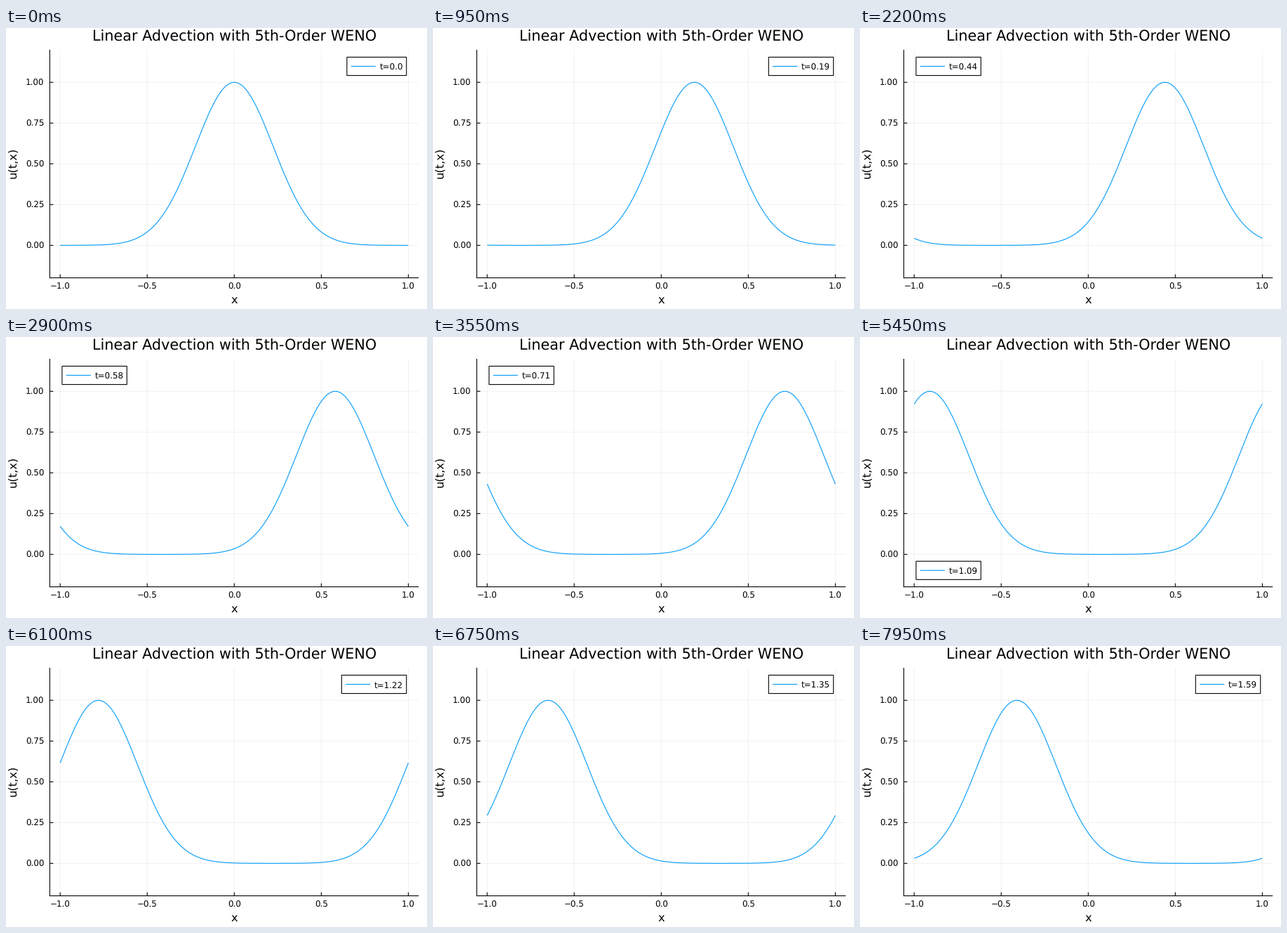
Animation of 600 by 400 pixels, one loop 8000 ms. Source, as a matplotlib script:

```python
import numpy as np
import matplotlib.pyplot as plt
from matplotlib.animation import FuncAnimation
from matplotlib.patches import Rectangle

W, H, DPI = 600, 400, 100
FRAMES, INTERVAL = 160, 50
LEFT, RIGHT, TOP, BOTTOM = 62.4, 588.2, 31.0, 355.6
BLUE = "#009AFA"
SMALL, MEDIUM, LARGE = 11.87, 16.3, 20.77   # font heights in pixels

plt.rcParams["font.family"] = "DejaVu Sans"
plt.rcParams["text.hinting"] = "none"


def pt(px):
    return px * 72 / DPI


def to_x(v):
    return 325.3 + 248.1 * v


def to_y(v):
    return 309.4 - 232.1 * v


fig = plt.figure(figsize=(W / DPI, H / DPI), dpi=DPI, facecolor="white")
ax = fig.add_axes([0, 0, 1, 1])
ax.set_xlim(0, W)
ax.set_ylim(H, 0)
ax.axis("off")


def line(xs, ys, color="black", width=1.1, **kw):
    return ax.plot(xs, ys, color=color, lw=pt(width), snap=False,
                   solid_capstyle="butt", **kw)[0]


def label(x, y, s, size, ha="center", **kw):
    kw.setdefault("va", "baseline")
    return ax.text(x, y, s, fontsize=pt(size), ha=ha, **kw)


# Grid, ticks and tick labels
for v in (-1, -0.5, 0, 0.5, 1):
    x = to_x(v)
    line([x, x], [TOP, BOTTOM], alpha=0.055, width=1, zorder=1)
    line([x, x], [BOTTOM, BOTTOM - 5], zorder=2)
    label(x, 372, f"{v:.1f}".replace("-", "\u2212"), SMALL)
for v in (0, 0.25, 0.5, 0.75, 1):
    y = to_y(v)
    line([LEFT, RIGHT], [y, y], alpha=0.055, width=1, zorder=1)
    line([LEFT, LEFT + 5], [y, y], zorder=2)
    label(54.3, y + 4.4, f"{v:.2f}", SMALL, ha="right")

# Axes and titles
line([LEFT, LEFT], [TOP, BOTTOM + 0.5], zorder=2)
line([LEFT - 0.5, RIGHT], [BOTTOM, BOTTOM], zorder=2)
label(325.2, 18.3, "Linear Advection with 5th-Order WENO", LARGE)
label(325.3, 391.6, "x", MEDIUM)
label(10.2, 191.8, "u(t,x)", MEDIUM, va="center", rotation=90)

# Moving parts
xs = np.linspace(-1, 1, 401)
curve = line(to_x(xs), to_y(0 * xs), BLUE, zorder=3)
box = Rectangle((0, 0), 1, 26.1, fc="white", ec="black", lw=pt(1.1),
                snap=False, zorder=4)
ax.add_patch(box)
key = line([0, 0], [0, 0], BLUE, zorder=5)
tag = label(0, 0, "", SMALL, ha="left", zorder=5)


def corner(i):
    """Legend corner that keeps clear of the curve: (on the right, on top)."""
    if i <= 40 or i >= 113:
        return True, True
    if i < 88:
        return False, True
    return i <= 100, False


def update(i):
    t = round(i / 100, 2)
    d = (xs - t + 1) % 2 - 1
    curve.set_ydata(to_y(np.exp(-10 * d ** 2)))

    text = f"t={t}"
    width = 47.1 + 7.55 * len(text)
    on_right, on_top = corner(i)
    x = 570.7 - width if on_right else 79.9
    y = 41.5 if on_top else 319.2
    box.set_xy((x, y))
    box.set_width(width)
    key.set_data([x + 5.8, x + 41], [y + 13, y + 13])
    tag.set_text(text)
    tag.set_position((x + 46.6, y + 18.2))
    return curve, box, key, tag


anim = FuncAnimation(fig, update, frames=FRAMES, interval=INTERVAL,
                     repeat=True, repeat_delay=0, blit=False)
plt.show()
```
